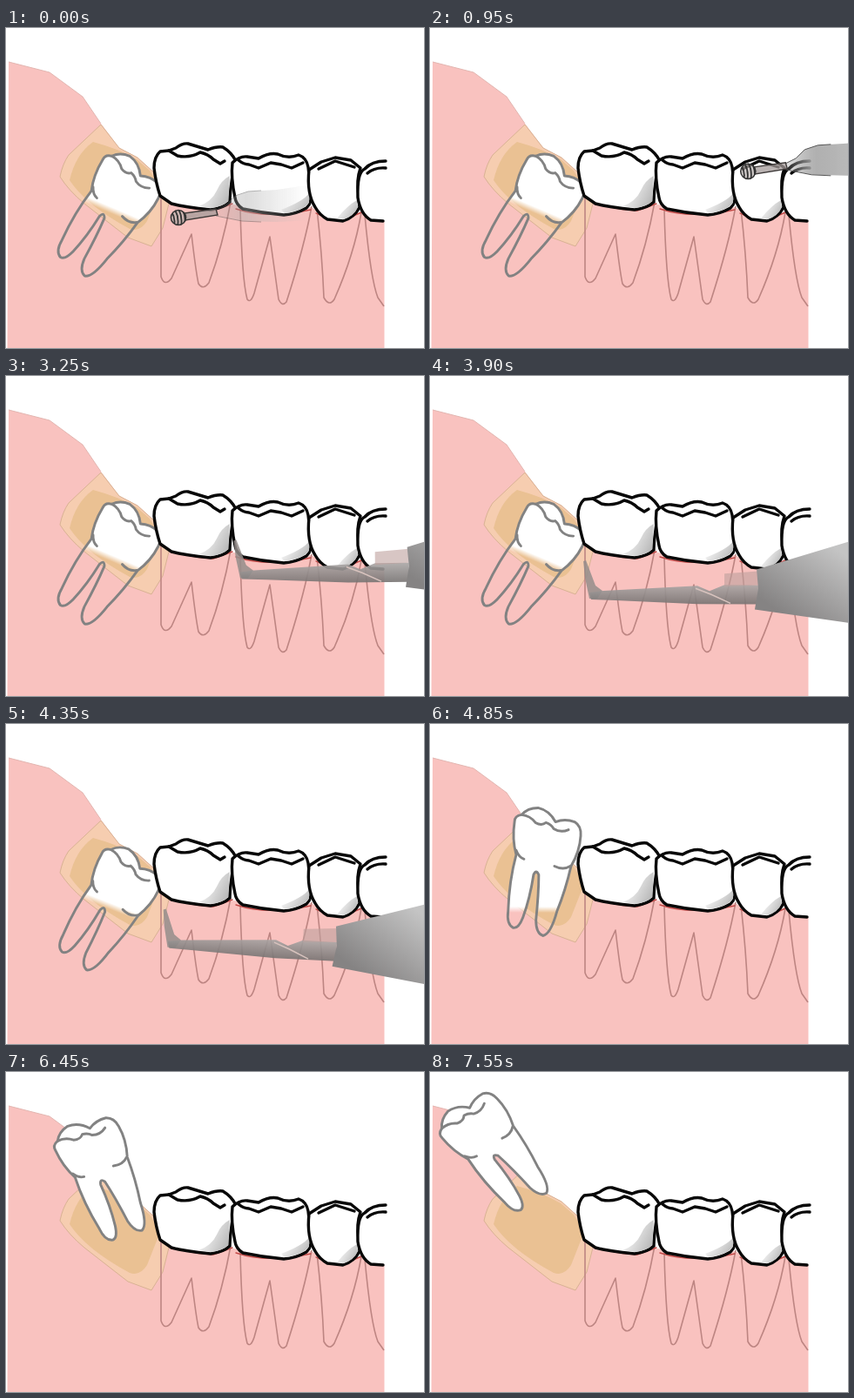
Animation of 480 by 368 pixels, one loop 7650 ms. Source, as an HTML page:

```html
<!DOCTYPE html>
<html lang="en">
<head>
<meta charset="utf-8">
<title>Wisdom tooth removal</title>
<style>
html, body { margin: 0; width: 100%; height: 100%; overflow: hidden; background: #fff; }
svg { display: block; width: 100vw; height: 100vh; }
.line { fill: none; stroke: #080808; stroke-width: 3.4; stroke-linecap: round; stroke-linejoin: round; }
.root { fill: none; stroke: #bd8582; stroke-width: 1.6; stroke-linejoin: round; }
.wisdom { stroke: #828282; stroke-width: 2.9; stroke-linecap: round; stroke-linejoin: round; }
</style>
</head>
<body>
<svg viewBox="0 0 480 368" xmlns="http://www.w3.org/2000/svg">
  <defs>
    <linearGradient id="shade" x1="0" y1=".2" x2="1" y2=".7">
      <stop offset="0" stop-color="#fff"/><stop offset=".5" stop-color="#dedede"/><stop offset="1" stop-color="#b8b8b8"/>
    </linearGradient>
    <linearGradient id="enamel" gradientUnits="userSpaceOnUse" x1="0" y1="0" x2="0" y2="300">
      <stop id="solid" stop-color="#fff"/><stop id="clear" stop-color="#fff" stop-opacity="0"/>
    </linearGradient>
    <linearGradient id="body" gradientUnits="userSpaceOnUse" x1="45" y1="0" x2="150" y2="0">
      <stop offset="0" stop-color="#8c8c8c" stop-opacity=".25"/>
      <stop offset=".32" stop-color="#b0b0b0"/>
      <stop id="bodyEnd" offset="1" stop-color="#c0c0c0"/>
    </linearGradient>
    <linearGradient id="grip" gradientUnits="userSpaceOnUse" x1="220" y1="25" x2="275" y2="-55">
      <stop offset="0" stop-color="#858383"/><stop offset="1" stop-color="#c4c4c4"/>
    </linearGradient>
    <linearGradient id="steel" x1="0" y1="0" x2="0" y2="1">
      <stop offset="0" stop-color="#aaa6a5"/><stop offset="1" stop-color="#777372"/>
    </linearGradient>
    <clipPath id="bur"><circle r="9"/></clipPath>
  </defs>

  <rect width="480" height="368" fill="#fff"/>
  <path fill="#f9c2bf" d="M3 39L50 51L88 79L109 110L130 138L151 149L172 168L177 192L235 206L262 203L300 212L350 206L380 220L408 212L420 222H434.5V368H1.5Z"/>
  <path fill="none" stroke="#e3b6b1" d="M3 39L50 51L88 79L109 110"/>
  <path fill="#f6cdb0" stroke="#d9b294" d="M109 111L72 146Q65 156 62 171Q72 187 90 202L140 241L167 251L180 230L188 198L172 168L151 149L130 138Z"/>
  <path fill="#eac193" d="M100 131Q80 145 73 175Q92 204 142 231Q154 235 162 222L177 184L165 164L150 151Q130 139 100 131Z"/>

  <g class="root">
    <path d="M178 192V286Q182 298 190 288L213 237Q218 280 221 294Q226 302 233 293Q249 250 258 200"/>
    <path d="M269 208Q271 290 277 312Q281 317 285 305L303 240L313 312Q317 321 322 315Q343 250 351 205"/>
    <path d="M357 208Q363 260 365 310Q371 321 377 312Q400 260 408 212"/>
    <path d="M412 215Q419 290 427 310L434 320"/>
  </g>

  <g id="tooth" class="wisdom">
    <path fill="url(#enamel)" d="M97 112Q97 105 105 104Q112 96 124 96Q137 99 144 112Q155 108 166 112Q174 117 173 128Q172 146 162 163Q156 190 146 215Q139 241 130 243Q122 240 122 225Q125 195 125 173Q122 166 119 173Q115 200 107 222Q102 235 96 234Q88 230 90 215Q91 180 99 150Q94 132 97 112Z"/>
    <path fill="none" d="M105 104Q115 105 121 113Q128 117 133 113Q139 115 142 120Q150 125 159 121M99 145Q102 153 108 155M143 163Q153 168 161 163"/>
  </g>

  <g class="line">
    <path stroke="#c34a48" stroke-width="1.4" d="M178 195Q205 209 238 210L260 202M264 208Q300 220 350 209M356 213Q380 226 408 212"/>

    <path fill="#fff" d="M170 161Q170 148 177 142L187 141L195 138Q203 132 209 133L232 140Q242 136 249 137Q259 143 264 153L260 170Q257 190 257 200Q250 207 235 209Q205 206 190 202L177 193Q172 178 170 161Z"/>
    <path fill="url(#shade)" stroke="none" d="M257 170Q247 175 242 187Q236 200 221 205L236 207Q250 205 255 199Z"/>
    <path d="M187 141L197 147Q211 150 223 143Q232 145 238 151L246 156L251 153"/>

    <path fill="#fff" d="M260 155Q268 147 277 148L290 150Q302 143 312 145Q324 151 336 146Q345 149 347 160L350 187Q352 201 345 207Q333 214 319 215Q295 213 272 208Q264 203 263 195Q258 172 260 155Z"/>
    <path fill="url(#shade)" stroke="none" d="M348 190Q342 199 316 209L320 213Q341 210 348 201Z"/>
    <path d="M267 152Q273 157 279 157L290 161L304 155L316 157L328 161L341 155"/>

    <path fill="#fff" d="M348 163L362 154L378 149L396 152L407 161Q402 175 405 192L406 206Q400 218 387 222L369 220Q360 215 355 206Q345 190 348 163Z"/>
    <path fill="url(#shade)" stroke="none" d="M403 198Q392 204 380 219L388 220Q400 216 404 206Z"/>
    <path d="M359 162L378 153L400 160"/>

    <path fill="#fff" stroke="none" d="M437 153Q420 152 412 162Q403 165 404 195Q408 215 420 221L434 222Z"/>
    <path d="M436 153Q420 153 412 162Q403 166 404 195Q407 214 419 221L433 222M415 167Q423 160 436 161"/>
  </g>

  <g id="drill">
    <g id="handpiece">
      <path fill="url(#body)" d="M43 -9L55 -15L65 -25L80 -30L113 -32L310 -62V-4L113 5L73 4L43 -2Z"/>
      <path fill="none" stroke="#555" d="M43 -9L55 -15L65 -25L80 -30L95 -31M43 -2L73 4L95 5"/>
    </g>
    <path fill="#a39a98" fill-opacity=".75" stroke="#3d3938" stroke-width="1.4" d="M7 -5L43 -10L45 -3L8 3Z"/>
    <circle r="8.6" fill="#b5adab" fill-opacity=".65" stroke="#333" stroke-width="1.5"/>
    <path clip-path="url(#bur)" fill="none" stroke="#333" stroke-width="1.8" d="M-8 -7Q-3 1 -5 9M-4 -9Q1 0 -1 10M0 -10Q5 -1 3 10M4 -9Q9 -2 7 8"/>
  </g>

  <g id="lever">
    <path fill="#958d8b" opacity=".85" d="M-11 -37L-8 -38L3 -9L11 -3L5 6L-4 6L-9 -18Z"/>
    <path fill="url(#steel)" opacity=".9" d="M-4 -1L12 -3L120 -9L134 -3L151 -10H190V12L120 12L26 8L-2 7Z"/>
    <path fill="#bfa19d" opacity=".6" d="M151 -23L190 -26V-10L151 -8Z"/>
    <path fill="none" stroke="#d8c3be" stroke-width="1.5" d="M118 -6L136 1L158 11"/>
    <path fill="url(#grip)" d="M188 -28L300 -62L440 -100V58L300 34L186 18L190 -6Z"/>
  </g>
</svg>
<script>
const LOOP = 7650, STEP = 85, LAST = 89;
const el = id => document.getElementById(id);

// Each row: time, then the values reached at that time
const drillKeys = [[0, 198, 218, 0.45, 0], [450, 278, 192, 0.9, 0.8], [950, 368, 164, 1, 1], [1650, 492, 125, 1, 1]];
const leverKeys = [[1800, 510, 180, -3], [2400, 409, 190, -3], [3400, 245, 234, 0], [3700, 187, 250, 0],
  [3800, 187, 250, 1.5], [3900, 187, 250, 0], [4150, 187, 250, 3], [4350, 190, 251, 3], [4780, 530, 262, 3]];
// x, y, angle, depth down to which the enamel is opaque
const toothKeys = [[4300, 139, 183, 23, 158], [4850, 135, 130, 0, 210], [6450, 99, 85, -33, 255], [7550, 53, 60, -48, 270]];

function at(keys, t) {
  const i = keys.findIndex(k => k[0] >= t);
  if (i === 0) return keys[0].slice(1);
  if (i < 0) return keys[keys.length - 1].slice(1);
  const a = keys[i - 1], b = keys[i], p = (t - a[0]) / (b[0] - a[0]);
  return a.slice(1).map((v, j) => v + (b[j + 1] - v) * p);
}

function place(id, x, y, angle = 0, tail = "") {
  el(id).setAttribute("transform", `translate(${x} ${y}) rotate(${angle}) ${tail}`);
}

function show(id, on) {
  el(id).setAttribute("display", on ? "inline" : "none");
}

function draw(t) {
  const [dx, dy, alpha, end] = at(drillKeys, t);
  place("drill", dx, dy);
  show("drill", t < 1650);
  el("handpiece").setAttribute("opacity", alpha);
  el("bodyEnd").setAttribute("stop-opacity", end);

  const [lx, ly, turn] = at(leverKeys, t);
  place("lever", lx, ly, turn);
  show("lever", t >= 1800 && t < 4780);

  const [x, y, angle, depth] = at(toothKeys, t);
  place("tooth", x, y, angle, "translate(-135 -130)");
  el("solid").setAttribute("offset", depth / 300);
  el("clear").setAttribute("offset", (depth + 7) / 300);
}

const start = performance.now();
function tick() {
  const t = (performance.now() - start) % LOOP;
  draw(Math.min(LAST, Math.floor((t + 15) / STEP)) * STEP);
  requestAnimationFrame(tick);
}
draw(0);
requestAnimationFrame(tick);
</script>
</body>
</html>
```
